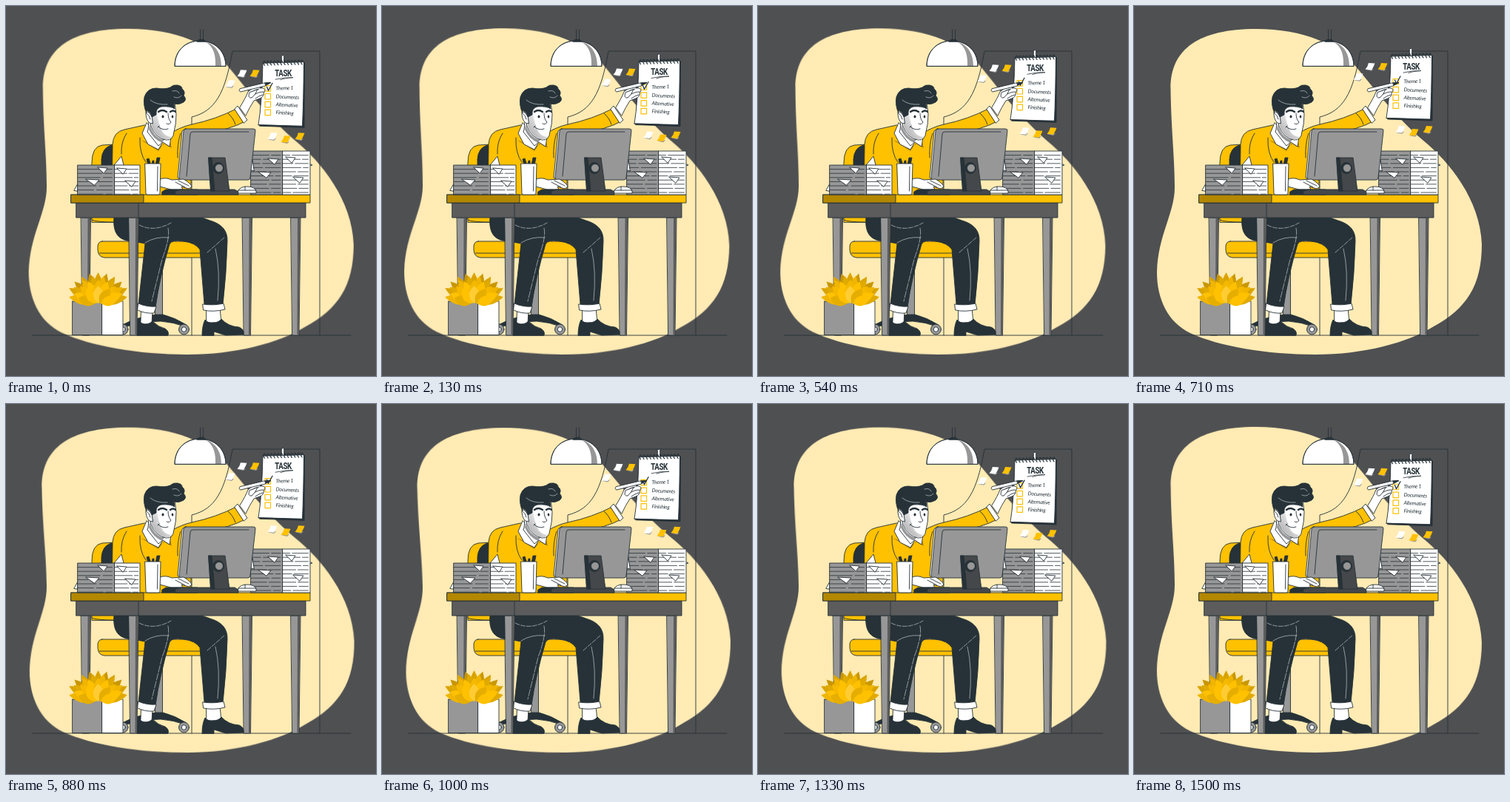
An HTML page for the animation above (1540 ms loop, 500 by 500 pixels).

```html
<!DOCTYPE html>
<html lang="en">
<head>
<meta charset="utf-8">
<title>Task list</title>
<style>
html, body { margin: 0; width: 100%; height: 100%; overflow: hidden; background: #4f5052; }
svg { display: block; width: 100vw; height: 100vh; }
.blob { transform-origin: 250px 250px; animation: sway 1540ms linear -60ms infinite; }
.float { animation: float 1540ms linear -60ms infinite; }
@keyframes sway {
  0%, 100% { transform: rotate(0deg); }
  25% { transform: rotate(1deg); }
  75% { transform: rotate(-1deg); }
}
@keyframes float {
  0%, 100% { transform: translateY(1px); }
  50% { transform: translateY(-9px); }
}
.ink { fill: #263238; }
.gold { fill: #ffc100; }
.deep { fill: #b38700; }
.mid { fill: #979797; }
.dim { fill: #5c5c5c; }
.dark { fill: #45484a; }
.white { fill: #fff; }
.none { fill: none; }
.bare { stroke: none; }
.seam { fill: none; stroke: #fff; stroke-width: .5; }
.title { font: 700 9.8px Roboto, sans-serif; letter-spacing: -.4px; }
.hand { font: italic 400 7px Lato, sans-serif; letter-spacing: -.2px; }
</style>
</head>
<body>
<svg viewBox="0 0 500 500" preserveAspectRatio="none">
<defs>
  <linearGradient id="beard" x1=".9" y1=".1" x2=".2" y2=".8">
    <stop offset=".1" stop-color="#fff"/><stop offset="1" stop-color="#b5b5b5"/>
  </linearGradient>
</defs>
<rect width="500" height="500" fill="#4f5052"/>
<path class="blob" fill="#ffebb3" d="M49.500 112C49 58 88 31 165 31C230 31 275 52 300 82C330 118 353 149 390 181C426 210 468 262 470 322C470 378 449 409 405 433C370 455 310 471 245 471C180 471 115 460 76 442C45 427 31 395 31 360C32 310 55 280 55 245C55 205 50 165 49.500 112Z"/>

<g stroke="#263238" stroke-width=".9" stroke-linejoin="round" stroke-linecap="round">
  <!-- room -->
  <g class="none">
    <path d="M36 445H466M251 445V150C283 142 296 118 306 61H424V445"/>
    <path d="M262.500 32V47M266.500 32V47"/>
  </g>
  <path class="white" d="M228 81C228 60 243 47 262 47S297 60 297 81Z"/>
  <path class="mid bare" d="M266 47.500C279 51 284 65 283 81H291C291 62 281 50 266 47.500Z"/>
  <path class="none" d="M228 81C228 60 243 47 262 47S297 60 297 81Z"/>
  <path class="ink" d="M258 48Q259 45 264 45T270 48Z"/>

  <!-- notepad and notes -->
  <g class="float">
    <g id="notes" class="bare"></g>
    <path class="ink" d="M348 78L403.500 76L403 164L343 162Z"/>
    <path class="white" d="M347 77L402.500 75.500Q402 130 400.500 162L341 160.500Q346 130 347 77Z"/>
    <path class="none" d="M341 160.500Q372 161 399 163.500"/>
    <rect class="white" x="372.300" y="66.500" width="3.400" height="10" rx="1"/>
    <g id="rings" class="none" stroke-width="1.200"></g>
    <text class="title ink bare" text-anchor="middle" transform="translate(374.500 94.500) scale(1 1.350)">TASK</text>
    <path class="none" d="M364 99Q377 96 388 96.500Q377 97 371 99.500" stroke-width=".8"/>
    <g id="list"></g>
    <path class="none" d="M352.500 109L354.500 114L360 104" stroke-width="1.300"/>
  </g>

  <!-- chair -->
  <path class="gold" d="M116 292V212Q116 190 130 188L147 187V292Z"/>
  <path class="ink" d="M129 220V207Q130 192 142 188L152 190V292H146Z"/>
  <path class="gold" d="M116 284V289Q121 292 147 292V284Z"/>
  <path class="mid" d="M202 338H211.500V420H202Z"/>
  <path class="ink" d="M157 431Q178 420 202 417H212Q228 421 244 431V434Q226 427 209 426Q188 426 159 434Z"/>
  <g class="mid"><circle cx="158" cy="437" r="7"/><circle cx="240.500" cy="437" r="7"/></g>
  <g class="white"><circle cx="158" cy="437" r="3.200"/><circle cx="240.500" cy="437" r="3.200"/></g>
  <path class="gold" d="M130 318H270V340H133Q124 339 124 329V324Q125 318 130 318Z"/>
  <path class="none" d="M126 334Q190 334 268 334"/>

  <!-- legs -->
  <g class="white">
    <path d="M183 410H198L197 430H182Z"/><path d="M271 408H289L291 428H271Z"/>
  </g>
  <g class="ink">
    <path d="M177 445V431Q180 425 184 429Q191 432 198 426Q206 434 215 436Q221 440 219 445Z"/>
    <path d="M265 445Q265 432 269 424Q273 429 280 428Q287 428 291 423Q300 433 315 434Q322 437 322 444L297 445L281 440V445Z"/>
    <path d="M146 285C144 306 151 317 171 318L188 321L179 403L202 407Q208 365 221 322Q224 315 240 318Q256 320 262 329L268 403L293 404Q298 360 299 318Q300 297 276 290L262 285Z"/>
  </g>
  <path class="white" d="M179 402Q190 407 203 406L200 415Q188 416 178 411Z"/>
  <path class="white" d="M266 403Q281 405 294 402L296 410Q280 414 267 411Z"/>
  <g class="seam">
    <path d="M219 300Q222 313 211 342L197 399" stroke-dasharray="9 2"/>
    <path d="M188 320Q202 311 220 313M283 328Q290 358 286 398"/>
    <path d="M180 296Q200 306 223 293M272 333Q287 320 296 312" stroke-dasharray="6 2"/>
  </g>

  <!-- torso and raised arm -->
  <path class="gold" d="M187 161L160 167Q145 170 144 187L143 256H250V208L268 172Q303 167 323 156L311 139Q284 153 251 160Q237 163 222 172Z"/>
  <path class="deep bare" d="M182 181L192 187L206 196L213 186L224 192L222 184L207 190Z"/>
  <path class="none" d="M163 172Q155 184 156 200M181 178Q180 199 189 211M236 172Q231 187 232 205M300 145Q307 151 310 160"/>
  <path class="white" d="M309 139L313 135L326 154L321.500 158Z"/>
  <path class="white" d="M316 137Q324 124 327 116Q334 109 341 107Q344 105 346 107L343 111Q350 110 350 114L348 118Q349 122 343 125L335 128Q329 137 324 148Z"/>
  <path class="none" d="M331 117Q336 113 342 112M334 121Q340 116 348 116M337 125Q342 121 347 120"/>
  <path class="white" d="M316 112Q314 115 317 116L350 108L358 103.500L349 104Z"/>
  <path class="ink" d="M350 104L358 103.500L351 107Z"/>
  <path class="white" d="M329 117Q326 125 332 124Q337 120 340 113Z"/>

  <!-- head -->
  <path class="white" d="M190 158L184 172L192 187L206 194L212 184L221 190L223 177L212 181Z"/>
  <path class="white" d="M193 150Q193 166 191 170L206 189Q211 186 213 180Z"/>
  <path class="mid bare" d="M194 160Q199 177 213 181L211 185Q199 180 193 167Z"/>
  <path class="white" d="M191 132L196 163Q202 178 216 181Q226 182 227 170Q230 160 230 146L228 130Z"/>
  <path fill="url(#beard)" class="bare" d="M196.500 148L197 163Q203 177 216 180.500Q222 181 224 177Q213 176 210 167Q206 158 204 145Z"/>
  <path class="white" d="M197 149Q188 137 189 146Q190 159 198 159Z"/>
  <path class="none" d="M191 146Q194 148 195 153"/>
  <path class="ink" d="M190 145Q185 134 187 123Q191 111 203 111Q215 113 222 110Q226 106 232 107Q238 108 238 112Q243 116 240 121Q245 126 240 130Q234 134 227 132L228 139Q222 135 210 136Q202 138 203 147L197 150Q195 142 190 141Z"/>
  <path class="seam" d="M195 127Q203 134 218 133M225 115Q232 113 234 118M227 123Q233 126 237 121" stroke-width=".8"/>
  <g class="none">
    <path d="M206 143Q211 139 217 143M222 143Q226 140 229 143" stroke-width="2.300"/>
    <path d="M219 145Q219 153 223 157Q221 161 217 159"/>
    <path d="M206 163Q212 169 219 166M207 162L205 164"/>
  </g>
  <g class="ink bare"><ellipse cx="212" cy="149.500" rx="1.500" ry="1.900"/><ellipse cx="225" cy="149.500" rx="1.300" ry="1.900"/></g>

  <!-- desk -->
  <g id="legs"></g>
  <path class="dim" d="M95 266H405V286H95Z"/>
  <path class="none" d="M179 266V286"/>
  <path class="gold" d="M88 255H411V266H88Z"/>
  <path class="deep" d="M88 255H186V266H88Z"/>

  <!-- things on the desk -->
  <path class="white" d="M146 215L156 203L159 215ZM92 249L97 240V250Z"/>
  <g id="stacks"></g>
  <path class="white" d="M242 166L238 169L232 232L237 235Z"/>
  <path class="mid" d="M243 166H334.500Q337.500 166 337 169L330 232Q329.500 235 327 235H237Q233.500 235 234 232L240 169Q240.500 166 243 166Z"/>
  <path class="none" d="M244 230L249 173Q249 170 253 170H328"/>
  <path class="white" d="M208 234Q216 231 224 235L240 234Q249 239 251 244L247 247L237 244L239 248H223L208 244Z"/>
  <path class="none" d="M229 238L242 245M233 236L247 243"/>
  <path class="ink" d="M211 251L216 248H259V255H211Z"/>
  <path class="dark" d="M229 250L236 248H309L314 251V255H229Z"/>
  <path class="dark" d="M274 205H296L302 250H277Z"/>
  <path class="ink" d="M274 205H278L282 250H277Z"/>
  <circle class="ink" cx="287" cy="219" r="7.500"/>
  <circle class="mid" cx="288" cy="219" r="5.500"/>
  <path class="white" d="M314 249Q317 244 326 244Q336 244 338 250V253H314Z"/>
  <path class="none" d="M314 249H338M323 244V249"/>
  <g class="ink">
    <path d="M192 215L190 207L193 206L196 215ZM197 215L198 209L200 209V215ZM202 215L204 205L208 205L206 215Z"/>
  </g>
  <path class="white" d="M188 213H209L208 253Q208 255 206 255H191Q189 255 189 253Z"/>
  <path class="none" d="M205 217L204.500 250"/>

  <!-- plant -->
  <path class="mid" d="M90 399H130V444.500H90Z"/>
  <path class="white" d="M130 399H158V444.500H130Z"/>
  <g id="plant" class="bare"></g>
</g>
</svg>
<script>
const put = (id, html) => document.getElementById(id).innerHTML += html;
const path = (cls, d, more = '') => `<path class="${cls}" d="${d}" ${more}/>`;

const note = ([x, y, gold]) =>
  path('mid', `M${x - 6} ${y + 4}l8 1.800l3-3z`) +
  path(gold ? 'gold' : 'white', `M${x - 2} ${y - 5}L${x + 6.5} ${y - 4.5}Q${x + 5} ${y} ${x + 2} ${y + 4.5}L${x - 6.5} ${y + 3.5}Q${x - 3} ${y} ${x - 2} ${y - 5}Z`);
put('notes', [[303, 105, 0], [319, 91, 0], [336, 91, 1],
  [360, 176, 0], [378, 180, 1], [397, 176, 1]].map(note).join(''));

for (let i = 0; i < 12; i++) {
  const x = 349.5 + i * 4.6, y = 77 - i * .12;
  put('rings', path('none', `M${x} ${y + 3}q-2.500-3-1-5.500q2-1 2 2`));
}

['Theme 1', 'Documents', 'Alternative', 'Finishing'].forEach((word, i) => {
  const y = 107.5 + i * 10.8;
  put('list', `<rect x="350" y="${y}" width="7.500" height="7.500" class="none" style="stroke:#ffc100" stroke-width="1.200"/>` +
    `<text class="hand ink bare" transform="translate(364.500 ${y + 6}) rotate(${i ? 3 : -2})">${word}</text>`);
});

for (const x of [108, 172.5, 326, 391.5]) {
  put('legs', path('mid', `M${x - 6.5} 286H${x + 6.5}L${x + 4.5} 445H${x - 4.5}Z`) +
    path('dim bare', `M${x + 2.5} 286.400H${x + 6}L${x + 4.2} 444.600H${x + 2}Z`));
}

// Sheets seen edge on, drawn as broken lines
function stack(x, y, w, h, cls, seed) {
  let s = path(cls, `M${x} ${y}h${w}v${h}h${-w}Z`);
  for (let i = 1, r = seed; i * 5.6 < h; i++) {
    r = (r * 37 + 11) % 101;
    const cut = w * (.2 + r / 101 * .5), ly = y + i * 5.6;
    s += path('none', `M${x} ${ly}h${cut}m${w * .08} 0H${x + w * .93}`, 'stroke-width=".8"');
  }
  return s;
}
const corner = (x, y, w) => path('white', `M${x} ${y}l${w} 1l${-w * .35} 7z`);
put('stacks',
  stack(97, 215, 50, 40, 'mid', 5) + stack(147, 215, 34, 40, 'white', 17) +
  path('white', 'M406 211L414 215L406 217Z') +
  stack(331, 196, 43, 59, 'mid', 29) + stack(374, 196, 37, 59, 'white', 41) +
  path('white', 'M333 209L326 220L335 223Z') +
  [[108, 234, 18], [124, 218, 13], [150, 219, 13], [161, 236, 14],
   [341, 224, 17], [354, 206, 14], [378, 204, 13], [388, 231, 14]].map(c => corner(...c)).join(''));

// Rows of petals fanned round the pot, back to front
const petal = (x, y, len, wide, turn, fill) =>
  `<path d="M0 0C${-wide} ${-len * .3} ${-wide} ${-len * .62} 0 ${-len}C${wide} ${-len * .62} ${wide} ${-len * .3} 0 0Z" fill="${fill}" transform="translate(${x} ${y}) rotate(${turn})"/>`;
function fan(n, spread, len, wide, y, tones) {
  for (let i = 0; i < n; i++) {
    const k = i / (n - 1) * 2 - 1;
    put('plant', petal(124.5 + k * 4, y, len, wide, k * spread, tones[i % tones.length]));
  }
}
fan(9, 62, 40, 9, 400, ['#d9a400', '#c99700']);
fan(8, 79, 36, 9, 400, ['#f0b500', '#e0aa00']);
fan(7, 66, 31, 9, 401, ['#ffc100', '#f5b900']);
fan(5, 72, 24, 9, 402, ['#e6ae00', '#ffc100', '#ffcd33']);
</script>
</body>
</html>
```
